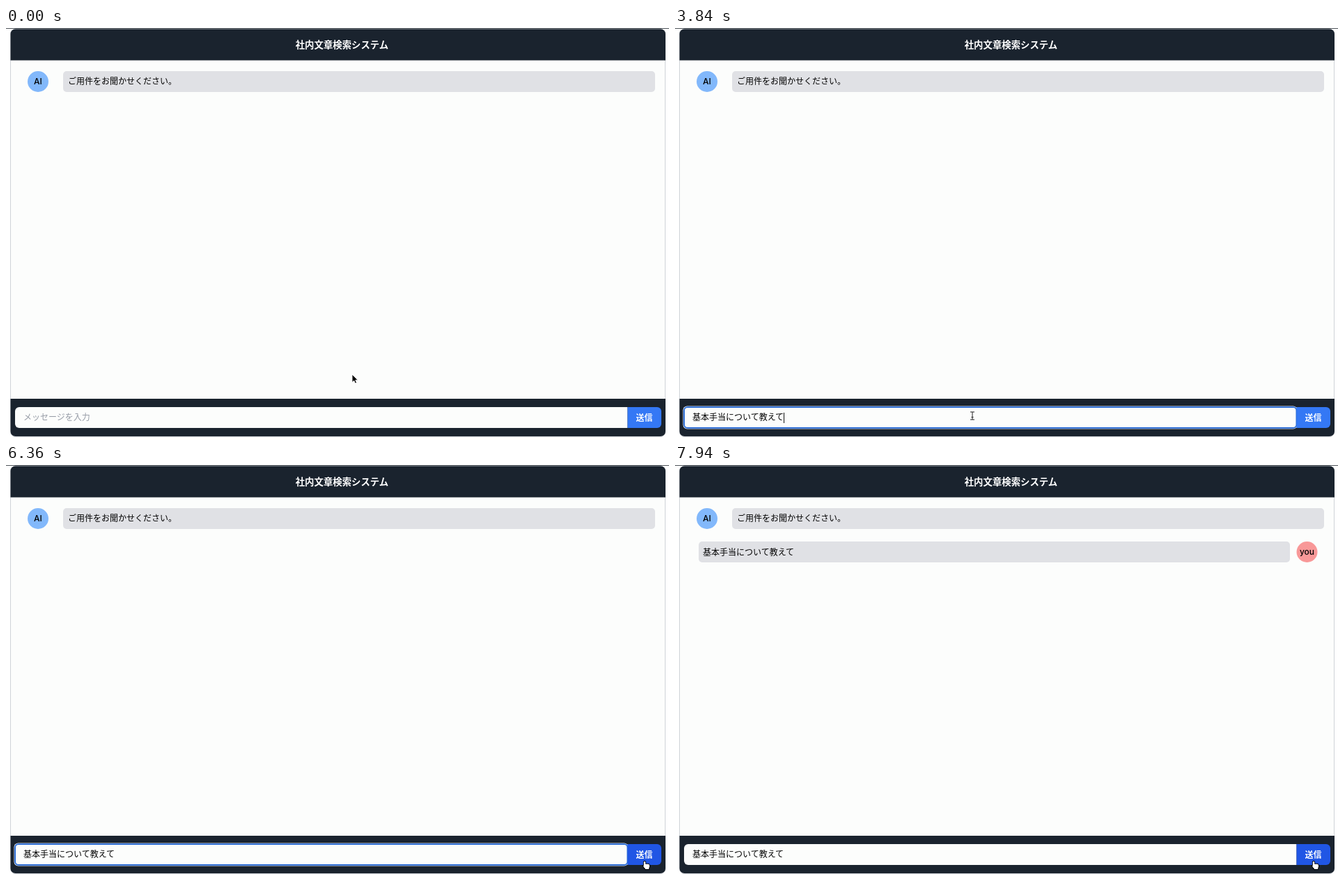
Animation, 952 px wide and 588 px high, one loop 8000 ms. Source, as an HTML page:

```html
<!DOCTYPE html>
<html lang="ja">
<head>
<meta charset="utf-8">
<title>社内文章検索システム</title>
<style>
  html, body { margin: 0; width: 100%; height: 100%; overflow: hidden; background: #fff; }
  svg { display: block; width: 952px; height: 588px; }
  text { font: 12px "Noto Sans CJK JP", "Noto Sans CJK", sans-serif; white-space: pre; }
  .middle { text-anchor: middle; }
  .bold { font-weight: 700; fill: #fff; }
  .name { font: 500 12px Inter, sans-serif; }
  .bubble { fill: #e0e1e5; }
  .bar { fill: #1a232e; }
  .paper { fill: #fcfdfc; }
</style>
</head>
<body>
<svg viewBox="0 0 952 588">
  <defs>
    <clipPath id="window"><rect x="6.5" y="1.5" width="940.5" height="585.5" rx="7"/></clipPath>
    <clipPath id="form"><rect x="13" y="545" width="928" height="30" rx="6"/></clipPath>
    <path id="beamShape" d="M-3 -5.5H3M0 -5.5V5.5M-3 5.5H3M-1.5 2H1.5"/>
    <g id="handShape">
      <rect x="-3.7" y="-5.5" width="2.4" height="9" rx="1.2"/>
      <rect x="-3.7" y="-1.8" width="8.2" height="5.5" rx="2"/>
      <rect x="-1.8" y="1" width="5.5" height="4.5"/>
      <path d="M-4.5 .8L-1.8 4.5V1Z"/>
    </g>
  </defs>

  <rect width="952" height="1" fill="#4b5157"/>
  <rect class="paper" x="6.5" y="1.5" width="940" height="586" rx="7" stroke="#cfd3d8"/>
  <g class="bar" clip-path="url(#window)">
    <rect width="952" height="46.5"/>
    <rect y="533" width="952" height="55"/>
  </g>
  <text class="bold middle" x="482.5" y="28.5" style="font-size:13.4px">社内文章検索システム</text>

  <circle cx="46" cy="77" r="15" fill="#82b8fb"/>
  <text class="name middle" x="46" y="81">AI</text>
  <rect class="bubble" x="82" y="62" width="850" height="30" rx="5"/>
  <text x="89" y="81">ご用件をお聞かせください。</text>

  <g id="reply">
    <rect class="bubble" x="34" y="110" width="849" height="30" rx="5"/>
    <text x="40" y="129.5">基本手当について教えて</text>
    <circle cx="907.5" cy="125" r="15" fill="#f89898"/>
    <text class="name middle" x="907.5" y="129">you</text>
  </g>

  <rect id="halo" x="11.5" y="543.5" width="882" height="33" rx="6" fill="#fff"/>
  <rect class="paper" width="892.5" height="588" clip-path="url(#form)"/>
  <rect id="ring" x="13" y="545" width="879.5" height="30" rx="5" fill="none" stroke="#2b6cd4" stroke-width="2"/>
  <text id="field" x="25" y="564"></text>
  <rect id="caret" y="553" width="1" height="15" fill="#111"/>
  <g clip-path="url(#form)"><rect id="button" x="892.5" width="60" height="588"/></g>
  <text class="bold middle" x="916.5" y="564.5">送信</text>

  <path id="arrow" d="M0 0V11.5L2.7 9L4.5 13L6.5 12L4.8 8.2H8.3Z" stroke="#fff" stroke-width=".9"/>
  <g id="beam">
    <use href="#beamShape" stroke="#fff" stroke-width="2.2"/>
    <use href="#beamShape" stroke="#222"/>
  </g>
  <g id="hand">
    <use href="#handShape" stroke="#000" stroke-width="1.8"/>
    <use href="#handShape" fill="#fff"/>
  </g>
</svg>
<script>
const LOOP = 8000, STEP = 20;
const QUESTION = '基本手当について教えて';
const $ = id => document.getElementById(id);
const show = (id, on) => { $(id).style.display = on ? '' : 'none'; };
const easeIn = k => k * k;
const easeOut = k => k * (2 - k);

// Each glide carries the pointer on to its next resting place.
const glides = [
  { from: 0, to: 260, x: 434, y: 530, ease: easeOut },
  { from: 500, to: 730, x: 422, y: 554, ease: easeOut },
  { from: 1000, to: 1150, x: 422, y: 557, ease: easeOut },
  { from: 3000, to: 3160, x: 427, y: 557.5, ease: easeOut },
  { from: 5100, to: 5800, x: 843.5, y: 573.5, ease: easeIn },
  { from: 5800, to: 5880, x: 919.5, y: 575.5, ease: easeOut }
];

function pointer(t) {
  let x = 497, y = 498;
  for (const glide of glides) {
    const k = Math.min(1, Math.max(0, (t - glide.from) / (glide.to - glide.from)));
    x += (glide.x - x) * glide.ease(k);
    y += (glide.y - y) * glide.ease(k);
  }
  return [x, y];
}

function caretVisible(t) {
  if (t < 3840) return t < 2600;
  return t < 5310 || (t - 5310) % 1000 >= 500;
}

function draw(t) {
  const typed = t >= 3840, focused = t >= 1290 && t < 7780;
  $('field').textContent = typed ? QUESTION : 'メッセージを入力';
  $('field').style.fill = typed ? '#000' : '#969ca6';
  $('caret').setAttribute('x', typed ? 156 : 25);
  show('caret', focused && caretVisible(t));
  show('halo', focused);
  show('ring', focused);
  show('reply', t >= 7860);
  $('button').setAttribute('fill', t >= 5900 ? '#2056e5' : '#3478f5');

  const cursor = t < 530 ? 'arrow' : t < 5840 ? 'beam' : 'hand';
  for (const id of ['arrow', 'beam', 'hand']) show(id, id === cursor);
  // The pointer is sampled in steps, as a screen recorder does.
  $(cursor).setAttribute('transform', `translate(${pointer(Math.floor(t / STEP) * STEP)})`);
}

const start = performance.now();
function tick() {
  draw((performance.now() - start) % LOOP);
  requestAnimationFrame(tick);
}
tick();
</script>
</body>
</html>
```
